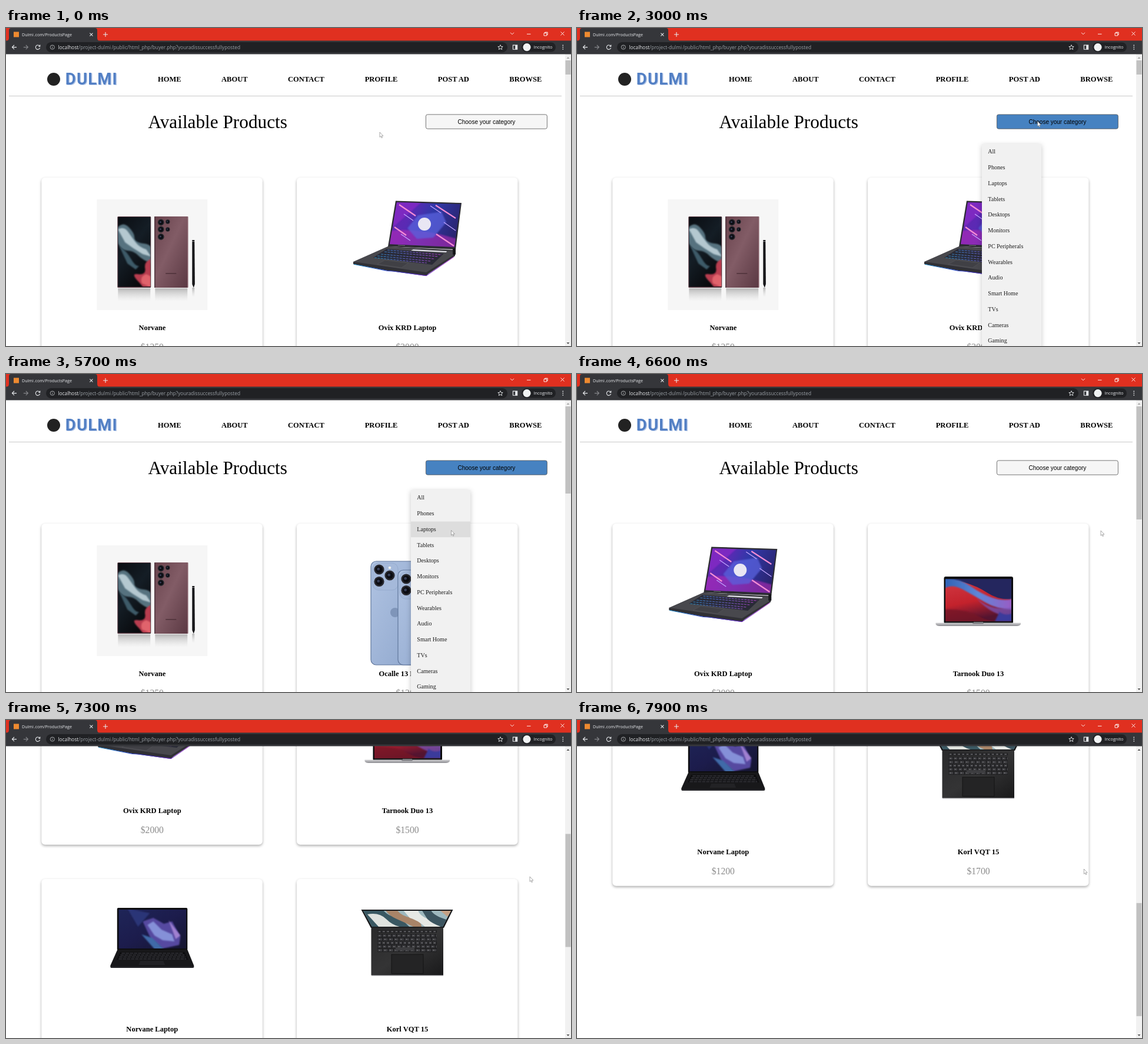
These frames come from a looping animation (960x540 px, 8 s). An HTML page:

```html
<!DOCTYPE html>
<html lang="en">
<head>
<meta charset="utf-8">
<title>Products page</title>
<style>
  html, body { margin: 0; width: 100%; height: 100%; overflow: hidden; background: #fff; }
  svg { display: block; width: 960px; height: 540px; }
  .ui { font-family: "Open Sans", sans-serif; fill: #e8eaed; }
  .serif { font-family: "Liberation Serif", "Times New Roman", serif; }
  .nav { font-size: 12.55px; font-weight: bold; }
  .mid { text-anchor: middle; }
  .brand { font: 700 27.5px Roboto, sans-serif; letter-spacing: 1.2px; }
  .card { fill: #fff; filter: drop-shadow(0 2px 2px rgba(0,0,0,.33)); }
  .menu { fill: #f1f1f1; filter: drop-shadow(0 2px 4px rgba(0,0,0,.22)); }
  .line { fill: none; stroke: #e8eaed; stroke-width: 1.1; }
</style>
</head>
<body>
<svg viewBox="0 0 960 540">
  <defs>
    <linearGradient id="smoke" x2=".6" y2="1">
      <stop offset="0" stop-color="#0a0d12"/><stop offset=".5" stop-color="#141d25"/><stop offset="1" stop-color="#08090c"/>
    </linearGradient>
    <linearGradient id="wine" x2="1" y2="1">
      <stop offset="0" stop-color="#69434d"/><stop offset=".45" stop-color="#825c66"/><stop offset="1" stop-color="#5a3842"/>
    </linearGradient>
    <linearGradient id="fade" x2="0" y2="1">
      <stop offset="0" stop-color="#777" stop-opacity=".5"/><stop offset="1" stop-color="#bbb" stop-opacity="0"/>
    </linearGradient>
    <linearGradient id="neon" x2="1" y2=".3">
      <stop offset="0" stop-color="#6a25b0"/><stop offset=".35" stop-color="#5a2ab4"/>
      <stop offset=".6" stop-color="#3038a8"/><stop offset="1" stop-color="#2a2470"/>
    </linearGradient>
    <linearGradient id="keys">
      <stop offset="0" stop-color="#2a7fa8"/><stop offset=".35" stop-color="#4a62b0"/><stop offset="1" stop-color="#a03ab0"/>
    </linearGradient>
    <linearGradient id="edge">
      <stop offset="0" stop-color="#1a86c0"/><stop offset=".45" stop-color="#3a35c8"/><stop offset="1" stop-color="#a32bc0"/>
    </linearGradient>
    <linearGradient id="dune" x2=".3" y2="1">
      <stop offset="0" stop-color="#d23a44"/><stop offset=".6" stop-color="#c3222c"/><stop offset="1" stop-color="#541430"/>
    </linearGradient>
    <linearGradient id="wave">
      <stop offset="0" stop-color="#2f62b4"/><stop offset=".5" stop-color="#5f86d8"/><stop offset="1" stop-color="#9a5cc4"/>
    </linearGradient>
    <linearGradient id="silver" x2="0" y2="1">
      <stop offset="0" stop-color="#d4d4d6"/><stop offset="1" stop-color="#8b8b90"/>
    </linearGradient>
    <linearGradient id="night" x2="1" y2="1">
      <stop offset="0" stop-color="#1f2558"/><stop offset=".5" stop-color="#1c1c4c"/><stop offset="1" stop-color="#15152f"/>
    </linearGradient>
    <linearGradient id="deck" x2="1" y2="1">
      <stop offset="0" stop-color="#2a2a2b"/><stop offset=".5" stop-color="#343435"/><stop offset="1" stop-color="#19191a"/>
    </linearGradient>
    <linearGradient id="sky" x2="1" y2="1">
      <stop offset="0" stop-color="#b0c3e2"/><stop offset="1" stop-color="#8fa7cd"/>
    </linearGradient>
    <filter id="soft"><feGaussianBlur stdDeviation="1.3"/></filter>
    <clipPath id="front"><rect x="130" y="67" width="55" height="118"/></clipPath>
    <clipPath id="neonScreen"><path d="M170 42 278 45 268 118 158 113Z"/></clipPath>
    <clipPath id="duneScreen"><rect x="132" y="94" width="112" height="72"/></clipPath>
    <clipPath id="nightScreen"><rect x="131" y="52" width="115" height="66"/></clipPath>
    <clipPath id="wideScreen"><path d="M113 54H262L248 81H128Z"/></clipPath>
  </defs>

  <rect width="960" height="540" fill="#fff"/>
  <g id="page"></g>

  <g id="menu"></g>

  <rect x="950" y="44" width="10" height="496" fill="#f1f1f1"/>
  <path id="up" d="M952.5 52 955 49.2 957.5 52Z"/>
  <path d="M952.5 534 955 536.8 957.5 534Z" fill="#505050"/>
  <rect id="thumb" x="950.5" width="9" fill="#c1c1c1"/>

  <g class="ui">
    <rect width="960" height="22" fill="#e03020"/>
    <rect y="21.5" width="960" height="23" fill="#35363a"/>
    <path d="M0 22Q5 22 5 17V4Q5 0 9 0H151Q155 0 155 4V17Q155 22 160 22Z" fill="#35363a"/>
    <rect x="13" y="6.5" width="9" height="9" fill="#ee8a30"/>
    <text y="13.6" font-size="7.14"><tspan x="27">Dulmi</tspan><tspan x="47.6">.com/ProductsPage</tspan></text>
    <path class="line" d="M142.4 8.6l5 5m0-5l-5 5M165 11h8m-4-4v8"/>
    <path class="line" style="stroke:#fff;stroke-width:.9" d="M857 7.8l3 3 3-3M885 10.3h6.5M914 8.6h4.8v4.4h-4.8zM915.6 8.6V7.2h4.6v4.3h-1.4M942.5 6.5l6 6m0-6l-6 6"/>
    <rect x="68" y="24" width="784" height="17.4" rx="8.7" fill="#202124"/>
    <rect x="876" y="24.5" width="58" height="16" rx="8" fill="#202124"/>
    <path class="line" d="M18 32.6H10.4m3.6-3.6l-3.6 3.6 3.6 3.6"/>
    <path class="line" style="stroke:#85868a" d="M29.8 32.6h7.6m-3.6-3.6l3.6 3.6-3.6 3.6"/>
    <path class="line" d="M57.2 30.8a3.7 3.7 0 1 0 .4 2.8M57.8 28.6v2.7h-2.7"/>
    <g class="line" style="stroke:#c4c7c9;stroke-width:.8"><circle cx="78.8" cy="32.6" r="3.6"/><path d="M78.8 32v2.5m0-4.2v.9"/></g>
    <text y="35.7" font-size="8.31"><tspan x="88.5">localhost</tspan><tspan fill="#9aa0a6">/project-dulmi</tspan><tspan x="179.4" fill="#9aa0a6">/public/html_php/buyer.php?youradissuccessfullyposted</tspan></text>
    <path class="line" style="stroke-width:.9" d="M840 28.6l1.2 2.8 3 .2-2.3 2 .8 3-2.7-1.7-2.7 1.7.8-3-2.3-2 3-.2z"/>
    <path class="line" d="M861.4 29.1h7.3v7.2h-7.3z"/><path d="M865.2 29h3.5v7.4h-3.5z"/>
    <circle cx="885" cy="32.6" r="6.6" fill="#f1f3f4"/>
    <text x="896.5" y="35.3" font-size="7.37">Incognito</text>
    <circle cx="946.3" cy="29.4" r=".9"/><circle cx="946.3" cy="32.6" r=".9"/><circle cx="946.3" cy="35.8" r=".9"/>
  </g>
  <path id="cursor" d="M0 0V8.4L1.9 6.7 3.2 9.7 4.5 9.1 3.2 6.2H5.9Z" fill="#fff" stroke="#666" stroke-width=".55"/>
</svg>
<script>
const LOOP = 8000, ROW = 26.75, MENU_TOP = 197;
const $ = id => document.getElementById(id);
const rect = (x, y, w, h, fill, more = '') => `<rect x="${x}" y="${y}" width="${w}" height="${h}" fill="${fill}" ${more}/>`;
const dot = (x, y, r, fill, more = '') => `<circle cx="${x}" cy="${y}" r="${r}" fill="${fill}" ${more}/>`;
const path = (d, fill, more = '') => `<path d="${d}" fill="${fill}" ${more}/>`;
const stroke = (d, color, width, more = '') => path(d, 'none', `stroke="${color}" stroke-width="${width}" ${more}`);
const clip = (id, body) => `<g clip-path="url(#${id})">${body}</g>`;
const text = (x, y, size, body, more = '') => `<text class="serif" x="${x}" y="${y}" font-size="${size}" ${more}>${body}</text>`;
const soft = 'filter="url(#soft)"';
const lens = (x, y, r) => dot(x, y, r, '#27272d') + dot(x, y, r * .68, '#0b0c12') + dot(x - r * .15, y - r * .1, r * .28, '#363d56');

// Product art, in card coordinates
const art = {
  stylusPhone: () => rect(94, 37, 188, 188, '#f6f6f6')
    + rect(130, 188, 55, 22, 'url(#fade)') + rect(193, 188, 55, 22, 'url(#fade)') + rect(256, 187, 4, 16, 'url(#fade)')
    + rect(129, 66, 57, 121, '#5d3d46', 'rx="1.5"') + rect(130, 67, 55, 118.5, 'url(#smoke)')
    + clip('front',
        path('M128 86Q138 74 148 84T158 102 174 112 187 128V146Q172 140 164 132T146 124 130 112Z', '#56727f', soft)
      + path('M130 88Q140 82 147 92T160 110 178 122L186 134 172 130 156 120 142 110Z', '#b4c8d0', soft)
      + path('M132 116Q144 124 152 138T166 150L160 156 146 146Z', '#3d5a68', soft)
      + path('M187 138Q174 142 176 154T164 164 166 178L174 188H188Z', '#b83e50', soft)
      + path('M178 164Q166 168 171 180L186 186V168Z', '#e0636c', soft))
    + rect(192, 66, 57, 121, 'url(#wine)', 'rx="1.5"') + rect(192, 66, 1.2, 121, '#3f2730') + rect(247.8, 66, 1.2, 121, '#8e6670')
    + lens(203, 76, 5.4) + lens(203, 88, 5.4) + lens(203, 100.5, 5.4) + lens(214.5, 75, 3.7) + lens(214.5, 88, 3.7)
    + rect(211, 162, 18, 1.6, '#50333b')
    + path('M256 109H260L260.6 181 258.5 187 256 181Z', '#17171a') + rect(256, 106, 4, 2.5, '#17171a'),

  neonLaptop: () => path('M168 39.5 280 43 270 122 155 117Z', '#2c2c32')
    + clip('neonScreen', rect(155, 38, 130, 85, 'url(#neon)')
      + path('M150 92Q200 82 272 104V122H150Z', '#b42ab8', soft + ' opacity=".6"')
      + path('M164 40H214L164 84Z', '#8a2cc8', soft + ' opacity=".7"')
      + path('M188 86 206 64 246 58 254 76 232 102 204 104Z', '#5a62dc', soft + ' opacity=".75"')
      + stroke('M174 46l28 19m34-18l34 22m-104 15l20 14m51-2l30 20', '#f48cd4', 2.2)
      + stroke('M182 62l16 11m52 3l20 14m-43-42l18 12m-68 36l16 11', '#c0a4ff', 1.3))
    + dot(217, 79, 11, '#e9e6f3')
    + path('M155 117 269 123 269 133 224 163 220 167 154 158 96 147V143Z', '#303035')
    + path('M155 117 268 125 266 132 220 161 97 143Z', '#48484d')
    + path('M153 121 250 129 230 148 130 136Z', '#292a36')
    + stroke('M154 123l92 8m-97-5l91 8m-97-4l90 8m-96-5l91 9m-96-6l89 9', 'url(#keys)', 1.2, 'stroke-dasharray="4 1.4"')
    + path('M150 140 190 145 178 153 137 147Z', '#404045', 'stroke="#5a5a60" stroke-width=".5"')
    + path('M198 122 255 125 254 127 194 124Z', '#e4e4ec')
    + stroke('M97 147.2l57 11.2 10 .6 56 7.6 47-32', 'url(#edge)', 1.1)
    + rect(265, 120, 5, 11, '#17171b', 'rx="1"') + rect(172, 114.5, 12, 1, '#70707a', 'transform="rotate(2 172 114)"'),

  duneLaptop: () => rect(129.5, 90, 117.5, 80, '#0c0c0e', 'rx="3"')
    + clip('duneScreen', rect(132, 94, 112, 72, 'url(#dune)')
      + path('M130 92H246V128Q222 130 204 118T164 100 130 97Z', '#24265e')
      + path('M130 94Q154 92 174 106T212 126 246 128V146Q220 146 200 134T162 112 130 110Z', 'url(#wave)', soft)
      + path('M184 126Q210 150 246 142V158Q212 158 184 126Z', '#7a58c0', soft + ' opacity=".7"')
      + path('M130 146Q164 144 190 158T246 162V170H130Z', '#761426', soft + ' opacity=".8"')
      + path('M224 150Q234 158 246 152V166H216Z', '#3a3a9c', soft))
    + rect(132, 166, 112, 3, '#19191b') + rect(180, 167, 16, .9, '#88888c')
    + path('M115.5 168.5H260V171Q258 174 253 174H122Q117 174 115.5 171Z', 'url(#silver)')
    + path('M177 168.5H198L196 170.4H179Z', '#828287'),

  nightLaptop: () => rect(128.5, 49, 119.5, 72, '#0e0e11', 'rx="2"')
    + clip('nightScreen', rect(131, 52, 115, 66, 'url(#night)')
      + path('M172 72 190 66 208 76 222 72 236 98 234 112 206 118 186 102Z', '#5648a0', soft)
      + path('M180 78 190 72 204 86 222 94 226 106 206 104 192 96Z', '#8590d8', soft)
      + path('M170 94 188 100 208 119H192Z', '#3f6aa8', soft)
      + path('M216 70 236 96 228 102Z', '#a080d0', soft)
      + path('M146 50 184 58 164 81Z', '#2b3677', soft))
    + path('M129 120H248L259 147V150Q258 151 256 151H119Q117 151 117 149V147Z', '#18181a')
    + path('M134 124H243L249 137H128Z', '#0d0d0f')
    + stroke('M136 126h105m-107 3.2h109m-111 3.2h113m-114 3.2h115', '#2c2c31', 2.2, 'stroke-dasharray="6 1"')
    + path('M168 139H207L210 146H165Z', '#222225') + rect(118, 149, 140, 1.4, '#2d2d31'),

  wideLaptop: () => path('M109.5 52H265.5L250 83H126Z', '#17181a')
    + clip('wideScreen', rect(110, 52, 156, 31, '#9db8be')
      + path('M108 52H146Q154 62 166 64T192 82H126Z', '#3a5862')
      + path('M120 60Q140 56 152 68T180 82H140Z', '#dfe2de')
      + path('M150 52H170Q176 62 194 66T212 82H200Q184 74 170 68T150 52Z', '#a88468')
      + path('M180 52H206Q208 64 230 70L246 83H220Q206 70 192 66Z', '#e6e8e4')
      + path('M212 52H228Q230 62 258 70L248 82Q230 76 222 68Z', '#3c5560')
      + path('M242 52H266L256 64Z', '#c4a084'))
    + rect(126.5, 82.5, 122.5, 81.5, 'url(#deck)', 'rx="1.5"') + rect(127, 163, 122, 1.3, '#7c7c80')
    + [0, 1, 2, 3, 4, 5].map(i => rect(137, 87.5 + i * 6.2, 101, i ? 5 : 3.5, '#111113')
      + stroke(`M137.5 ${(i ? 90 : 89.2) + i * 6.2}H238`, '#3d3d40', i ? 4 : 2.6, `stroke-dasharray="${6 + i % 3} 1.2"`)
      + stroke(`M140 ${(i ? 90 : 89.2) + i * 6.2}H236`, '#a4a4a8', 1, `stroke-dasharray="1.4 ${5.8 + i % 3}"`)).join('')
    + rect(168, 116.2, 32, 5, '#3d3d40')
    + rect(161, 128, 54, 32.5, '#242425', 'stroke="#101011" stroke-width=".8"'),

  bluePhones: () => [[126, 64, 80, 176], [172, 79, 78, 161]].map(([x, y, w, h], i) =>
      rect(x, y, w, h, 'url(#sky)', 'rx="9" stroke="#60779c" stroke-width="1.2"')
      + rect(x + 3, y + 3, 43, 46, '#a5b9da', 'rx="10" stroke="#8fa5c8" stroke-width=".7"')
      + lens(x + 14, y + (i ? 15 : 14), 8.6) + lens(x + 32, y + (i ? 25 : 24), 8.6) + lens(x + 14, y + 34.5, 8.6)
      + dot(x + 32, y + 11, 2.3, '#eef0ee')
      + dot(x + w / 2 + 1, y + h / 2 + (i ? 4 : -1), 8, '#7f95b9')).join('')
};

const goods = {
  stylus: ['stylusPhone', 'Norvane', 1250],
  neon: ['neonLaptop', 'Ovix KRD Laptop', 2000],
  blue: ['bluePhones', 'Ocalle 13 Neo Top', 1300],
  dune: ['duneLaptop', 'Tarnook Duo 13', 1500],
  night: ['nightLaptop', 'Norvane Laptop', 1200],
  wide: ['wideLaptop', 'Korl VQT 15', 1700]
};
// From time, thumb height, goods on show
const lists = [
  [0, 24, ['stylus', 'neon']],
  [5000, 148, ['stylus', 'blue']],
  [6100, 192, ['neon', 'dune', 'night', 'wide']]
];

const card = (key, i) => {
  const [pic, name, price] = goods[key];
  return `<g transform="translate(${i % 2 ? 494 : 60.3} ${254 + 371 * (i >> 1)})">
    <rect class="card" width="375.5" height="312.8" rx="6"/>${art[pic]()}
    ${text(188, 259, 12.5, name, 'text-anchor="middle" font-weight="bold"')}
    ${text(188, 292.5, 15.7, '$' + price, 'text-anchor="middle" fill="#8c8c8c"')}</g>`;
};

const nav = [['HOME', 258], ['ABOUT', 366], ['CONTACT', 479], ['PROFILE', 609.7], ['POST AD', 733.8], ['BROWSE', 855.3]];
$('page').innerHTML = dot(81, 87, 11, '#222')
  + '<text class="brand" x="102.3" y="97" fill="#b9cbea">DULMI</text><text class="brand" x="100.8" y="95.8" fill="#527fc4">DULMI</text>'
  + nav.map(([s, x]) => `<text class="serif nav" x="${x}" y="91.4">${s}</text>`).join('')
  + rect(5, 115, 939, 1, '#c8c8c8')
  + text(241.5, 170, 31.25, 'Available Products')
  + '<rect id="button" x="713.4" y="146.9" width="206" height="24.3" rx="3" stroke="#555" stroke-width=".8"/>'
  + '<text class="mid" x="816.4" y="162.6" font-size="10" font-family="Liberation Sans, Arial, sans-serif">Choose your category</text>'
  + lists.map(([, , keys], i) => `<g id="list${i}">${keys.map(card).join('')}</g>`).join('');

const items = ['All', 'Phones', 'Laptops', 'Tablets', 'Desktops', 'Monitors', 'PC Peripherals', 'Wearables', 'Audio', 'Smart Home', 'TVs', 'Cameras', 'Gaming'];
$('menu').innerHTML = '<rect class="menu" x="688" y="197" width="101" height="360"/>'
  + rect(688, 0, 101, ROW, '#ddd', 'id="hover"')
  + items.map((s, i) => text(698.3, 213.4 + i * ROW, 10.05, s, 'fill="#1c1c1c"')).join('');

const pointer = [
  [2200, 635, 177], [2500, 690, 168], [2800, 765, 158], [3000, 782.5, 158.5], [3100, 783, 162],
  [3400, 770, 196], [4000, 752, 228], [4500, 746, 236], [5100, 746, 238], [5200, 750, 248],
  [5300, 756, 261], [5400, 756, 261], [5700, 756.5, 265.5], [6100, 756.5, 265.5], [6200, 772, 266],
  [6300, 812, 267], [6600, 890, 266], [7600, 890, 266], [7900, 861.3, 253]
];
const scrolling = [
  [6600, 0], [6700, 40], [6800, 112], [6900, 152], [7000, 152], [7100, 200], [7200, 275],
  [7300, 355], [7400, 440], [7500, 504], [7600, 556], [7700, 606], [7800, 640], [7900, 656]
];

function at(track, t) {
  if (t <= track[0][0]) return track[0].slice(1);
  const i = track.findIndex(k => k[0] >= t);
  if (i < 0) return track[track.length - 1].slice(1);
  const a = track[i - 1], b = track[i], p = (t - a[0]) / (b[0] - a[0]);
  return a.slice(1).map((v, n) => v + (b[n + 1] - v) * p);
}

const show = (el, on) => el.setAttribute('visibility', on ? 'visible' : 'hidden');
const set = (id, name, value) => $(id).setAttribute(name, value);

function draw(t) {
  const [x, y] = at(pointer, t), [scroll] = at(scrolling, t);
  const open = t >= 2700 && t < 6300;
  const active = lists.filter(l => l[0] <= t).length - 1;
  const row = Math.floor((y - MENU_TOP) / ROW);
  set('page', 'transform', `translate(0 ${-scroll})`);
  lists.forEach((l, i) => show($('list' + i), i === active));
  set('button', 'fill', open ? '#4682c1' : '#f6f6f6');
  set('menu', 'display', open ? 'inline' : 'none');
  show($('hover'), open && row >= 0 && x > 688 && x < 789);
  set('hover', 'y', MENU_TOP + row * ROW);
  set('thumb', 'y', 55 + scroll * .39);
  set('thumb', 'height', lists[active][1]);
  set('up', 'fill', scroll ? '#505050' : '#a3a3a3');
  set('cursor', 'transform', `translate(${x} ${y})`);
}

const start = performance.now();
function tick() {
  const t = (performance.now() - start) % LOOP;
  draw(Math.floor(t / 100) * 100);
  requestAnimationFrame(tick);
}
tick();
</script>
</body>
</html>
```
